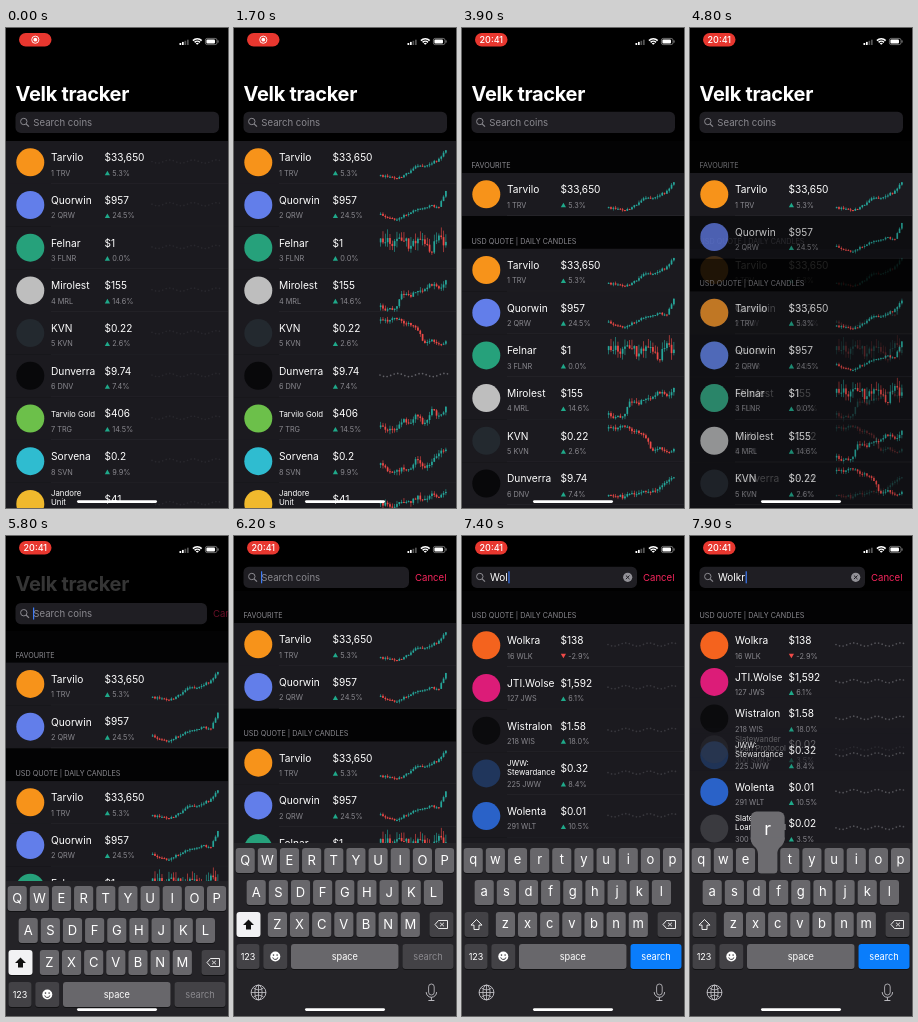
An HTML page with a canvas that plays this animation: 222 px wide and 480 px high, repeating every 8 s.

```html
<!DOCTYPE html>
<html lang="en">
<head>
<meta charset="utf-8">
<title>Coin list</title>
<style>
html, body { margin: 0; width: 100%; height: 100%; overflow: hidden; background: #000; }
canvas { display: block; width: 222px; height: 480px; }
</style>
</head>
<body>
<canvas id="stage"></canvas>
<script>
const W = 222, H = 480, LOOP = 8000, STEP = 100;
const ROW = 42.7, ROW_BG = '#1b1a1f', GREY = '#8a898f';
const UP = '#26a69a', DOWN = '#ef4a47';
const FONT = 'Inter, Roboto, "Liberation Sans", sans-serif';

const canvas = document.getElementById('stage');
const ctx = canvas.getContext('2d');
const ratio = window.devicePixelRatio || 1;
canvas.width = W * ratio;
canvas.height = H * ratio;

// name, subtitle, price, change, colour, chart load time, chart heights, noise
const coin = (name, sub, price, change, color, load, path, noise = 2) =>
  ({ name, sub, price, change, color, load, path, noise });

const market = [
  coin('Tarvilo', '1 TRV', '$33,650', 5.3, '#f7931a', 400, [35, 36, 38, 35, 31, 24, 26, 22, 19, 9]),
  coin('Quorwin', '2 QRW', '$957', 24.5, '#627eea', 500, [31, 34, 36, 33, 29, 26, 25, 22, 24, 8]),
  coin('Felnar', '3 FLNR', '$1', 0, '#26a17b', 700, [16, 14, 17, 13, 19, 15, 14, 23, 8, 18], 9),
  coin('Mirolest', '4 MRL', '$155', 14.6, '#bebebe', 800, [38, 41, 39, 25, 28, 22, 20, 15, 19, 12], 4),
  coin('KVN', '5 KVN', '$0.22', 2.6, '#23292f', 1000, [9, 9, 6, 10, 13, 17, 31, 29, 33, 31], 3),
  coin('Dunverra', '6 DNV', '$9.74', 7.4, '#08080a', 3400, [34, 33, 35, 31, 32, 29, 30, 26, 20, 14], 3),
  coin('Tarvilo Gold', '7 TRG', '$406', 14.5, '#6cc04a', 1200, [30, 32, 33, 23, 26, 17, 28, 13, 18, 11], 4),
  coin('Sorvena', '8 SVN', '$0.2', 9.9, '#2fbcd0', 1400, [25, 31, 32, 28, 29, 17, 28, 24, 12, 8], 4),
  coin('Jandore\nUnit', '9 JDU', '$41', 3.1, '#f0b92d', 1500, [21, 22, 23, 19, 20, 14, 17, 12, 14, 8], 4)
];
const lone = (name, sub, price, change, color) => coin(name, sub, price, change, color, Infinity);
const talvine = lone('Talvine', '14 TLW', '$0.13', 3.7, '#18b5e5');
const wolkra = lone('Wolkra', '16 WLK', '$138', -2.9, '#f4631e');
const loans = lone('Slatewander\nLoan Protocol', '300 SWLP', '$0.02', 3.5, '#3a3a3f');
const matches = [
  wolkra,
  lone('JTI.Wolse', '127 JWS', '$1,592', 6.1, '#dc1c78'),
  lone('Wistralon', '218 WIS', '$1.58', 18, '#0b0b0d'),
  lone('JWW:\nStewardance', '225 JWW', '$0.32', 8.4, '#20365c'),
  lone('Wolenta', '291 WLT', '$0.01', 10.5, '#2a62c8'),
  loans
];

const presses = [['w', 6400], ['o', 6850], ['l', 7150], ['k', 7450], ['r', 7790]];

const clamp = x => Math.max(0, Math.min(1, x));
const span = (t, start, length) => clamp((t - start) / length);
const smooth = (t, start, length) => { const x = span(t, start, length); return x * x * (3 - 2 * x); };
const easeOut = x => 1 - (1 - x) ** 3;

function random(seed) {
  return () => {
    seed = (seed * 16807) % 2147483647;
    return seed / 2147483647;
  };
}

function withAlpha(a, draw) {
  if (a <= 0) return;
  ctx.save();
  ctx.globalAlpha *= Math.min(1, a);
  draw();
  ctx.restore();
}

function text(str, x, y, size, color = '#fff', align = 'left', weight = 400) {
  ctx.font = `${weight} ${size}px ${FONT}`;
  ctx.textAlign = align;
  ctx.fillStyle = color;
  ctx.fillText(str, x, y + size * 0.36);
}

function rect(x, y, w, h, color) {
  ctx.fillStyle = color;
  ctx.fillRect(x, y, w, h);
}

function round(x, y, w, h, r, color) {
  ctx.fillStyle = color;
  ctx.beginPath();
  ctx.roundRect(x, y, w, h, r);
  ctx.fill();
}

function disc(x, y, r, color) {
  ctx.fillStyle = color;
  ctx.beginPath();
  ctx.arc(x, y, r, 0, 7);
  ctx.fill();
}

function ring(x, y, r, color, width = 1, from = 0, to = 2 * Math.PI) {
  ctx.strokeStyle = color;
  ctx.lineWidth = width;
  ctx.beginPath();
  ctx.arc(x, y, r, from, to);
  ctx.stroke();
}

function poly(points, color, width) {
  ctx.beginPath();
  points.forEach(([x, y]) => ctx.lineTo(x, y));
  if (width) {
    ctx.strokeStyle = color;
    ctx.lineWidth = width;
    ctx.stroke();
  } else {
    ctx.fillStyle = color;
    ctx.fill();
  }
}

function candles(c, top) {
  const n = 29, rnd = random(c.sub.length * 977 + c.path[2] * 131 + c.path[7]);
  let last = c.path[0];
  for (let i = 0; i < n; i++) {
    const u = i / (n - 1) * (c.path.length - 1), k = Math.min(Math.floor(u), c.path.length - 2);
    const base = c.path[k] + (c.path[k + 1] - c.path[k]) * (u - k);
    const next = base + (rnd() - 0.5) * c.noise;
    const color = next <= last ? UP : DOWN, x = 145.8 + i * 2.33;
    const hi = Math.min(last, next), lo = Math.max(last, next);
    const wickUp = rnd() * c.noise, wickDown = rnd() * c.noise;
    rect(x + 0.55, top + hi - wickUp, 0.6, lo - hi + wickUp + wickDown, color);
    rect(x, top + hi, 1.7, Math.max(1, lo - hi), color);
    last = next;
  }
}

function placeholder(top, t) {
  withAlpha(0.12 + 0.26 * (1 - Math.cos(t / 540)), () => {
    for (let i = 0; i < 20; i++)
      disc(146 + i * 3.55, top + 20.5 + Math.sin(i * 0.95) * 1.6, 0.85, '#8a8a90');
  });
}

function drawRow(c, top, t, alpha = 1, glow = 0) {
  if (top > H || top < -ROW) return;
  // the backdrop fades faster than the content, so crossfades darken
  withAlpha(alpha * alpha, () => {
    rect(0, top, W, ROW + 0.3, ROW_BG);
    if (glow) rect(0, top, W, ROW, `rgba(255,255,255,${glow * 0.08})`);
    rect(45, top + ROW - 0.5, W - 45, 0.6, '#2b2a2f');
  });
  withAlpha(alpha, () => {
    disc(24.3, top + 21.3, 14, c.color);
    const lines = c.name.split('\n');
    if (lines.length > 1) lines.forEach((s, i) => text(s, 45, top + 11 + i * 9, 7.8));
    else text(c.name, 45, top + 16.5, c.name.length > 10 ? 7.8 : 10.2);
    text(c.sub, 45, top + 32, 7.3, GREY);
    text(c.price, 98.5, top + 16.5, 10.1);
    const y = top + 32, d = c.change < 0 ? -1 : 1;
    poly([[98.8, y + 2.3 * d], [104, y + 2.3 * d], [101.4, y - 2.3 * d]], d > 0 ? '#1fa98a' : DOWN);
    text(c.change.toFixed(1) + '%', 106.3, y, 7.3, GREY);
    const shown = span(t, c.load, 200);
    withAlpha(1 - shown, () => placeholder(top, t));
    withAlpha(shown, () => candles(c, top));
  });
}

function drawHeader(label, y, alpha = 1) {
  withAlpha(alpha, () => {
    rect(0, y - 25, W, 32.7, '#030304');
    text(label, 9.5, y, 7.2, GREY);
  });
}

const FAV = 'FAVOURITE', QUOTE = 'USD QUOTE | DAILY CANDLES';

// Sectioned list with a number of favourites on top
function drawSections(favs, t, dy, alpha, rowShift = 0, glow = 0) {
  if (alpha <= 0) return;
  const favTop = 145 + dy, second = favTop + favs * ROW + 25.3;
  drawHeader(FAV, favTop - 7.2, alpha);
  drawHeader(QUOTE, second, alpha);
  market.forEach((c, i) =>
    drawRow(c, second + 7.7 + rowShift + i * ROW, t, alpha, i === 1 ? glow : 0));
  for (let i = 0; i < favs; i++) drawRow(market[i], favTop + rowShift + i * ROW, t, i ? alpha : 1);
}

function drawList(t, nav) {
  if (t < 6750) {
    const first = smooth(t, 2880, 300), second = smooth(t, 4600, 300);
    market.forEach((c, i) => drawRow(c, 113 + 32 * first + i * ROW, t, 1 - first ** 2,
      i === 0 ? span(t, 2500, 200) : 0));
    drawSections(1, t, 0, first * (1 - second ** 2), -32 * (1 - first), span(t, 4250, 200));
    drawSections(2, t, -58 * nav, second);
    return;
  }
  const found = smooth(t, 6750, 300), more = smooth(t, 7150, 250), close = smooth(t, 7820, 250);
  const old = (1 - found) ** 2;
  if (old > 0) {
    for (let i = 0; i < 2; i++) drawRow(market[i], 87 + i * ROW, t, old);
    market.forEach((c, i) =>
      drawRow(c, 206 - 148 * found + i * (ROW - 54.4 * found), t, old));
  }
  const pitch = ROW + 58 * (1 - found), fade = Math.min(1, 2 * found);
  if (more < 1)
    [market[1], talvine].forEach((c, i) => drawRow(c, 88 + i * pitch, t, fade));
  const tight = ROW - 25 * close;
  matches.slice(1).forEach((c, i) => drawRow(c, 88 + (i + 1) * tight, t, more));
  if (close > 0) drawRow(loans, 82 + 3 * tight, t, close * 1.3);
  drawRow(wolkra, 88 + 2 * pitch * (1 - more), t, fade);
  drawHeader(QUOTE, 79.8);
}

function drawStatus(t) {
  const clock = smooth(t, 2000, 400);
  round(13, 5, 32.5, 13.5, 6.7, '#e8372f');
  withAlpha(1 - clock, () => {
    ring(29.3, 11.7, 3.6, '#fff', 0.9);
    disc(29.3, 11.7, 1.9, '#fff');
  });
  withAlpha(clock, () => text('20:41', 29.3, 11.8, 9, '#fff', 'center', 500));
  for (let i = 0; i < 4; i++) rect(173.5 + i * 2.5, 15 - i * 1.1, 1.7, 2 + i * 1.1, i < 2 ? '#fff' : '#555');
  for (let i = 0; i < 3; i++) ring(191.3, 17, 1.4 + i * 2.4, '#fff', 1.6, Math.PI * 1.25, Math.PI * 1.75);
  ctx.strokeStyle = '#999';
  ctx.lineWidth = 0.7;
  ctx.beginPath();
  ctx.roundRect(199.4, 10.4, 11.6, 6.2, 1.8);
  ctx.stroke();
  round(200.4, 11.4, 8.6, 4.2, 1, '#fff');
  rect(211.6, 12.4, 0.9, 2.2, '#999');
}

function drawNav(t, nav, typed) {
  rect(0, 0, W, 113 - 58 * nav, '#000');
  withAlpha(1 - 2.5 * nav, () => {
    ctx.letterSpacing = '-0.3px';
    text('Velk tracker', 9.5, 66.2 - 58 * nav, 20, '#fff', 'left', 700);
    ctx.letterSpacing = '0px';
  });
  const y = 94.3 - 53 * nav, right = 213 - 38 * nav;
  round(9.5, y - 10.6, right - 9.5, 21.2, 5.5, '#1f1e23');
  ring(17.8, y - 0.8, 3.2, GREY, 1);
  poly([[20.1, y + 1.5], [23, y + 4.4]], GREY, 1.2);
  if (typed) {
    text(typed, 28, y, 10);
    disc(165.7, y, 4.6, '#929197');
    poly([[163.9, y - 1.8], [167.5, y + 1.8]], '#1f1e23', 1);
    poly([[167.5, y - 1.8], [163.9, y + 1.8]], '#1f1e23', 1);
  } else {
    text('Search coins', 27.3, y, 9.6, GREY);
  }
  if (t >= 5700) {
    ctx.font = `400 10px ${FONT}`;
    ctx.textAlign = 'left';
    rect(typed ? 28.6 + ctx.measureText(typed).width : 27, y - 6, 1.2, 12, '#3d7bf5');
  }
  withAlpha(nav * 1.3, () => text('Cancel', 219 - 38 * nav, y, 9.6, '#f5255c'));
}

const rows = ['qwertyuiop', 'asdfghjkl', 'zxcvbnm'], starts = [11.2, 22.2, 43.4];
const KEY = '#68676b', DARK = '#434246';

function keyCap(x, y, w, color) {
  round(x, y - 12, w, 25.4, 3, '#121214');
  round(x, y - 12.5, w, 25, 3, color);
}

function drawPopup(letter, x, y) {
  const g = ctx;
  g.fillStyle = '#6d6c70';
  g.beginPath();
  g.roundRect(x - 17, y - 49, 34, 33, 6);
  g.fill();
  g.beginPath();
  g.moveTo(x - 17, y - 23);
  g.bezierCurveTo(x - 17, y - 13, x - 9.6, y - 15, x - 9.6, y - 6);
  g.lineTo(x - 9.6, y + 10);
  g.quadraticCurveTo(x - 9.6, y + 13, x - 6.6, y + 13);
  g.lineTo(x + 6.6, y + 13);
  g.quadraticCurveTo(x + 9.6, y + 13, x + 9.6, y + 10);
  g.lineTo(x + 9.6, y - 6);
  g.bezierCurveTo(x + 9.6, y - 15, x + 17, y - 13, x + 17, y - 23);
  g.fill();
  text(letter, x, y - 32, 18, '#fff', 'center');
}

function drawKeyboard(t, typed) {
  const rise = easeOut(span(t, 5600, 500));
  if (!rise) return;
  const dy = 176 * (1 - rise), caps = !typed;
  const line = i => 324.5 + i * 32 + dy;
  rect(0, 307 + dy, W, H, '#242327');
  let popup = null;
  rows.forEach((keys, r) => [...keys].forEach((k, i) => {
    const x = starts[r] + i * 22.15, y = line(r);
    keyCap(x - 9.6, y, 19.2, KEY);
    text(caps ? k.toUpperCase() : k, x, y - (caps ? 0 : 0.8), 13, '#fff', 'center');
    const hit = presses.find(([p, at]) => p === k && t >= at && t < at + (k === 'r' ? 210 : 120));
    if (hit) popup = [k === 'w' || k === 'o' ? k.toUpperCase() : k, x, y];
  }));
  const y2 = line(2), y3 = line(3);
  keyCap(2.5, y2, 24, caps ? '#f2f2f4' : DARK);
  const arrow = [[14.5, y2 - 5], [20, y2 + 0.6], [17, y2 + 0.6], [17, y2 + 5], [12, y2 + 5],
    [12, y2 + 0.6], [9, y2 + 0.6], [14.5, y2 - 5]];
  if (caps) poly(arrow, '#111'); else poly(arrow, '#fff', 0.9);
  keyCap(195.5, y2, 24, DARK);
  poly([[201, y2], [204.5, y2 - 4], [213.5, y2 - 4], [213.5, y2 + 4], [204.5, y2 + 4], [201, y2]], '#fff', 0.9);
  poly([[206, y2 - 1.8], [210, y2 + 1.8]], '#fff', 0.8);
  poly([[210, y2 - 1.8], [206, y2 + 1.8]], '#fff', 0.8);

  keyCap(2.5, y3, 23, DARK);
  text('123', 14, y3, 9, '#fff', 'center');
  keyCap(29.3, y3, 24, DARK);
  disc(41.3, y3, 5, '#fff');
  disc(39.5, y3 - 1.4, 0.8, DARK);
  disc(43.1, y3 - 1.4, 0.8, DARK);
  ring(41.3, y3 + 0.4, 2.6, DARK, 1, 0.2, Math.PI - 0.2);
  keyCap(57, y3, 107.5, KEY);
  text('space', 110.8, y3, 9.2, '#fff', 'center');
  keyCap(168.5, y3, 51, typed ? '#0a7dfb' : DARK);
  text('search', 194, y3, 9.2, typed ? '#fff' : '#8a898e', 'center');

  const y4 = 456.5 + dy, tone = '#c9c8cd';
  ring(24.5, y4, 7.4, tone, 0.9);
  poly([[17, y4], [32, y4]], tone, 0.8);
  poly([[24.5, y4 - 7.4], [24.5, y4 + 7.4]], tone, 0.8);
  ctx.beginPath();
  ctx.ellipse(24.5, y4, 3.6, 7.4, 0, 0, 7);
  ctx.stroke();
  ring(24.5, y4 - 10, 7.4, tone, 0.8, 0.8, 2.34);
  ring(24.5, y4 + 10, 7.4, tone, 0.8, 3.94, 5.48);
  ctx.beginPath();
  ctx.roundRect(194.6, y4 - 8.5, 5.6, 11, 2.8);
  ctx.stroke();
  ring(197.4, y4 - 0.4, 5.2, tone, 0.9, 0, Math.PI);
  poly([[197.4, y4 + 4.8], [197.4, y4 + 8]], tone, 0.9);
  poly([[194.4, y4 + 8], [200.4, y4 + 8]], tone, 0.9);
  if (popup) drawPopup(...popup);
}

function draw(t) {
  const nav = smooth(t, 5650, 400);
  const letters = presses.filter(p => t >= p[1] + 80).map(p => p[0]).join('');
  const typed = letters.charAt(0).toUpperCase() + letters.slice(1);
  ctx.setTransform(ratio, 0, 0, ratio, 0, 0);
  ctx.globalAlpha = 1;
  rect(0, 0, W, H, '#000');
  drawList(t, nav);
  drawNav(t, nav, typed);
  drawKeyboard(t, typed);
  drawStatus(t);
  round(71, 472.2, 80, 2.8, 1.4, '#fff');
}

const begin = performance.now();
function tick() {
  const t = (performance.now() - begin) % LOOP;
  draw(Math.floor(t / STEP) * STEP);
  requestAnimationFrame(tick);
}
tick();
</script>
</body>
</html>
```
